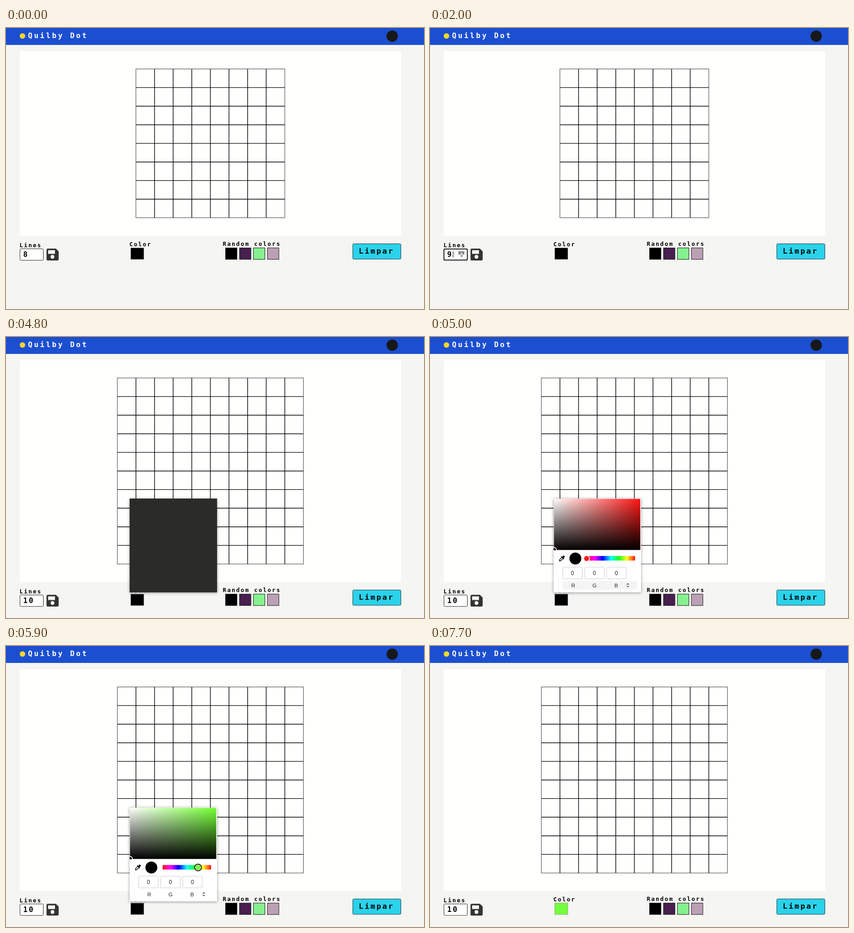
These frames come from a looping animation (913 by 614 pixels, 8 s). An HTML page:

```html
<!DOCTYPE html>
<html lang="en">
<head>
<meta charset="utf-8">
<title>Pixel grid editor</title>
<style>
html, body { margin: 0; width: 100%; height: 100%; overflow: hidden; background: #f5f5f2; }
svg { display: block; width: 913px; height: 614px; }
.px { font: bold 12.5px "DejaVu Sans Mono", monospace; letter-spacing: 2.25px; }
.title { font-size: 16px; letter-spacing: 3.5px; fill: #fff; }
.num { font-size: 16px; letter-spacing: 2.7px; }
.btn { font-size: 16.5px; letter-spacing: 2.95px; }
.ui { font: 12px "Liberation Sans", Arial, sans-serif; text-anchor: middle; fill: #222; }
.ui .lab { font-size: 11.5px; }
.line { fill: none; stroke: #000; stroke-width: 1.4; }
.edge { fill: none; stroke: #222; stroke-width: .9; }

/* every change is a hard step on one 8 s clock */
.a { animation: 8s step-end infinite; }
.off { opacity: 0; }

#panel { height: 403.5px; animation-name: panel; }
@keyframes panel { 36.25% { height: 485px; } }
#bar { animation-name: bar; }
@keyframes bar { 36.25% { transform: translateY(81.2px); } }
#grid8 { animation-name: hideGrid; }
@keyframes hideGrid { 36.25% { opacity: 0; } }
#grid10 { animation-name: showGrid; }
@keyframes showGrid { 36.25% { opacity: 1; } }

#save { fill: #333; animation-name: save; }
@keyframes save {
  8.75% { fill: #666; } 10% { fill: #333; }
  32.5% { fill: #666; } 37.5% { fill: #333; }
}
#n8 { animation-name: n8; }
@keyframes n8 { 25% { opacity: 0; } }
#n9 { animation-name: n9; }
@keyframes n9 { 25% { opacity: 1; } 27.5% { opacity: 0; } }
#n10 { animation-name: n10; }
@keyframes n10 { 27.5% { opacity: 1; } }
#focus { animation-name: focus; }
@keyframes focus { 25% { opacity: 1; } 36.25% { opacity: 0; } }
#caret { animation-name: caret; }
@keyframes caret {
  25% { opacity: 1; }
  27.5% { opacity: 1; transform: translateX(13px); }
  31.25% { opacity: 0; }
}
#spin { animation-name: spin; }
@keyframes spin { 13.75% { opacity: 1; } 31.25% { opacity: 0; } }
#spinHot { animation-name: spinHot; }
@keyframes spinHot { 20% { opacity: 1; } 28.75% { opacity: 0; } }

#picker { filter: drop-shadow(0 1px 3px rgba(0,0,0,.4)); animation-name: picker; }
@keyframes picker { 60% { opacity: 1; } 96.25% { opacity: 0; } }
#body { animation-name: body; }
@keyframes body { 61.25% { opacity: 1; } }
#row { animation-name: row; }
@keyframes row { 62.5% { opacity: 1; } 71.25% { opacity: 0; } }
.hue { fill: #ff1414; animation-name: hue; }
@keyframes hue {
  71.25% { fill: #5a18ff; } 72.5% { fill: #18ff99; } 73.75% { fill: #72ff34; }
}
#thumb { transform: translate(342px, 484px); animation-name: thumb; }
@keyframes thumb {
  71.25% { transform: translate(371px, 484px); }
  72.5% { transform: translate(402px, 484px); }
  73.75% { transform: translate(419.5px, 484px); }
}
#ring { animation-name: ring; }
@keyframes ring { 71.25% { opacity: 1; } 83.75% { opacity: 0; } }
#dot { transform: translate(271px, 465px); animation-name: dot; }
@keyframes dot {
  83.75% { transform: translate(420px, 385px); }
  85% { transform: translate(445px, 362px); }
  86.25% { transform: translate(459px, 354px); }
}
.pick { fill: #000; animation-name: pick; }
@keyframes pick {
  83.75% { fill: #68b840; } 85% { fill: #72ed3f; } 86.25% { fill: #74ff3e; }
}
#v0 { animation-name: v0; }
@keyframes v0 { 83.75% { opacity: 0; } }
#v1 { animation-name: v1; }
@keyframes v1 { 83.75% { opacity: 1; } 85% { opacity: 0; } }
#v2 { animation-name: v2; }
@keyframes v2 { 85% { opacity: 1; } 86.25% { opacity: 0; } }
#v3 { animation-name: v3; }
@keyframes v3 { 86.25% { opacity: 1; } }
</style>
</head>
<body>
<svg viewBox="0 0 913 614">
  <defs>
    <linearGradient id="white"><stop stop-color="#fff"/><stop offset="1" stop-color="#fff" stop-opacity="0"/></linearGradient>
    <linearGradient id="black" x2="0" y2="1"><stop stop-opacity="0"/><stop offset="1"/></linearGradient>
    <linearGradient id="rainbow">
      <stop stop-color="#ff1414"/><stop offset=".167" stop-color="#f0f"/>
      <stop offset=".333" stop-color="#00f"/><stop offset=".5" stop-color="#1ff"/>
      <stop offset=".667" stop-color="#1bff1b"/><stop offset=".833" stop-color="#ffff28"/>
      <stop offset="1" stop-color="#ff1414"/>
    </linearGradient>
    <clipPath id="field"><rect x="270.5" y="353.5" width="189" height="112"/></clipPath>
  </defs>

  <rect width="913" height="614" fill="#f5f5f2"/>
  <rect width="913" height="37" fill="#1c4fd0"/>
  <circle cx="36" cy="17.5" r="6" fill="#fcd72b"/>
  <text class="px title" x="48" y="22">Quilby Dot</text>
  <circle cx="843.5" cy="17.8" r="12.4" fill="#17181c"/>

  <rect id="panel" class="a" x="30" y="50.5" width="833" fill="#fffffe"/>
  <g id="grid8" class="a"></g>
  <g id="grid10" class="a off"></g>

  <g id="bar" class="a">
    <text class="px" x="29.5" y="479">Lines</text>
    <rect x="30.5" y="482.5" width="51" height="25" rx="2" fill="#fff" stroke="#222"/>
    <rect id="focus" class="a off" x="30.5" y="482.8" width="51" height="24.4" rx="2" fill="none" stroke="#000" stroke-width="1.8"/>
    <text id="n8" class="px num a" x="37.5" y="499.5">8</text>
    <text id="n9" class="px num a off" x="37.5" y="499.5">9</text>
    <text id="n10" class="px num a off" x="37.5" y="499.5">10</text>
    <rect id="caret" class="a off" x="50" y="488" width="1" height="13"/>
    <g id="spin" class="a off">
      <path d="M66 494.5l3-3.5 3 3.5zM66 497l3 3.300 3-3.300z" fill="#555"/>
      <g id="spinHot" class="a off">
        <rect x="62" y="488" width="13" height="7" fill="#858585"/>
        <path d="M66 493.700l3-3.400 3 3.400z" fill="#eee"/>
      </g>
    </g>
    <path id="save" class="a" d="M91.500 482H109l6 6v17a3 3 0 0 1-3 3H91.500a3 3 0 0 1-3-3V485a3 3 0 0 1 3-3z"/>
    <path d="M92 485.500h15v8H92z" fill="#f5f5f2"/>
    <circle cx="101.500" cy="500" r="4.200" fill="#f5f5f2"/>

    <text class="px" x="269.500" y="477">Color</text>
    <rect class="pick a" x="272.500" y="480.500" width="28.500" height="25" stroke="#777" stroke-opacity=".6"/>

    <text class="px" x="473.500" y="476">Random colors</text>
    <g stroke="#111">
      <rect x="479.500" y="480.500" width="25" height="25"/>
      <rect x="510" y="480.500" width="25" height="25" fill="#47204e"/>
      <rect x="540.500" y="480.500" width="25" height="25" fill="#85f08e"/>
      <rect x="571" y="480.500" width="25" height="25" fill="#bba0b6"/>
    </g>

    <rect x="757.500" y="471.500" width="105" height="33.500" rx="2" fill="#2ad2ea" stroke="#143a40"/>
    <text class="px btn" x="770.500" y="493">Limpar</text>
  </g>

  <g id="picker" class="a off">
    <rect x="270" y="353" width="191" height="205" fill="#2b2b29"/>
    <g id="body" class="a off">
      <rect x="270" y="353" width="191" height="205" fill="#fff"/>
      <g clip-path="url(#field)">
        <rect class="hue a" x="270.500" y="353.500" width="189" height="112"/>
        <rect x="270.500" y="353.500" width="189" height="112" fill="url(#white)"/>
        <rect x="270.500" y="353.500" width="189" height="112" fill="url(#black)"/>
        <g id="dot" class="a">
          <circle class="pick a" r="5" stroke="#fff" stroke-width="1.800"/>
        </g>
      </g>

      <g transform="translate(288 484) rotate(45)">
        <rect x="-2.200" y="-8" width="4.400" height="6" rx="2"/>
        <rect x="-4" y="-3" width="8" height="2"/>
        <path d="M-1.800-1v6L0 7.500 1.800 5v-6" fill="#fff" stroke="#000" stroke-width="1.400"/>
      </g>
      <circle class="pick a" cx="317.500" cy="484" r="13"/>
      <rect x="342" y="478.500" width="106" height="10" rx="1.500" fill="url(#rainbow)"/>
      <g id="thumb" class="a">
        <circle r="7" fill="#fff" stroke="#bbb" stroke-width=".6"/>
        <circle id="ring" class="a off" r="7.400" fill="#fff" stroke="#000" stroke-width="1.800"/>
        <circle class="hue a" r="5.400"/>
      </g>

      <rect id="row" class="a off" x="290" y="533" width="162" height="19" rx="2" fill="#f4f4f4"/>
      <g fill="#fff" stroke="#ccc">
        <rect x="290" y="503" width="42.500" height="25.500" rx="1.500"/>
        <rect x="338" y="503" width="42.500" height="25.500" rx="1.500"/>
        <rect x="386" y="503" width="42.500" height="25.500" rx="1.500"/>
      </g>
      <g class="ui" id="values">
        <text class="lab" x="313" y="547">R</text>
        <text class="lab" x="359.500" y="547">G</text>
        <text class="lab" x="406.500" y="547">B</text>
      </g>
      <path d="M429.800 541l2.200-2.200 2.200 2.200M429.800 543.800l2.200 2.200 2.200-2.200" fill="none" stroke="#222" stroke-width="1.100"/>
    </g>
  </g>
</svg>
<script>
const make = (parent, tag, attrs, text = '') => {
  const el = document.createElementNS('http://www.w3.org/2000/svg', tag);
  for (const key in attrs) el.setAttribute(key, attrs[key]);
  el.textContent = text;
  return parent.appendChild(el);
};

const CELL = 40.65, MID = 446.4, TOP = 89.5;

function drawGrid(n) {
  const g = document.getElementById('grid' + n);
  const size = n * CELL, left = MID - size / 2;
  let d = '';
  for (let i = 1; i < n; i++) {
    d += `M${left + i * CELL} ${TOP}v${size}M${left} ${TOP + i * CELL}h${size}`;
  }
  make(g, 'path', { d, class: 'line' });
  make(g, 'rect', { x: left, y: TOP, width: size, height: size, class: 'edge' });
}
[8, 10].forEach(drawGrid);

const values = document.getElementById('values');
[[0, 0, 0], [94, 184, 39], [103, 237, 19], [98, 255, 0]].forEach((rgb, i) => {
  const g = make(values, 'g', { id: 'v' + i, class: i ? 'a off' : 'a' });
  rgb.forEach((v, k) => make(g, 'text', { x: 311 + 48 * k, y: 520 }, v));
});
</script>
</body>
</html>
```
